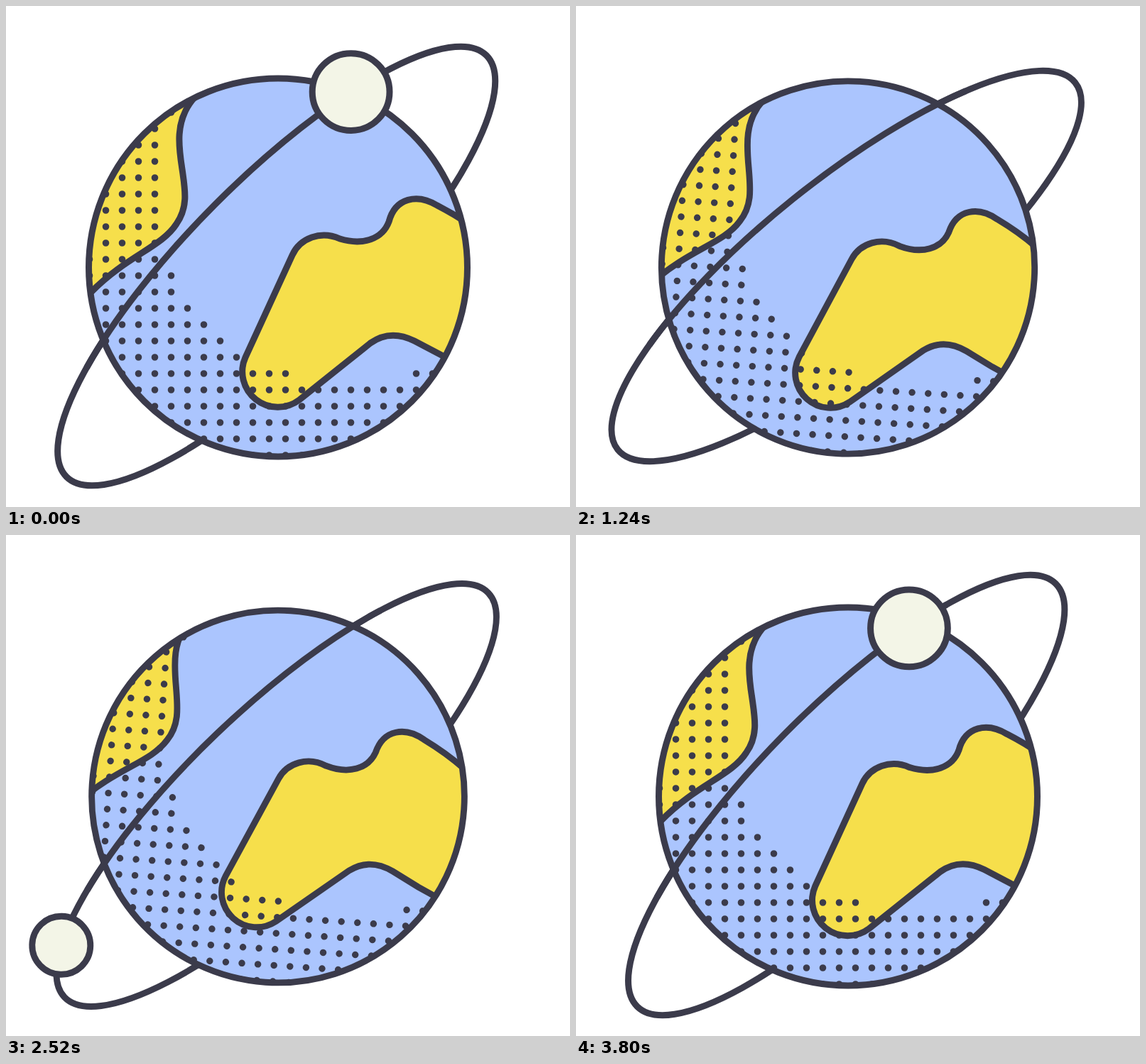
Animation, 794 px wide and 706 px high, one loop 3840 ms. Source, as an HTML page:

```html
<!DOCTYPE html>
<html lang="en">
<head>
<meta charset="utf-8">
<title>Planet and moon</title>
<style>
  html, body { margin: 0; width: 100%; height: 100%; overflow: hidden; background: #fff; }
  svg { display: block; width: 794px; height: 706px; }
  .line { stroke: #3b3b4b; stroke-width: 9; }
</style>
</head>
<body>
<svg viewBox="0 0 794 706" fill="none">
  <clipPath id="disc"><circle cx="383" cy="368.5" r="266.5"/></clipPath>

  <g class="ring">
    <path id="orbit" class="line" d="M419 0A419 122.5 0 0 1 -419 0A419 122.5 0 0 1 419 0Z"/>
    <circle id="moon" class="line" fill="#f3f5e7"/>
  </g>

  <g id="planet">
    <g clip-path="url(#disc)">
      <circle cx="383" cy="368.5" r="266.5" fill="#abc5fe"/>
      <g id="land" class="line" fill="#f6df4b">
        <path d="M285 105L262 133C238 163 243 198 248 230C252 258 257 283 240 307C219 340 170 352 120 403L60 460V105Z"/>
        <path d="M700 340L666 318Q640 298 607 281C579 264 548 270 539 304C530 328 503 338 470 328C443 316 414 327 403 351
                 L337 495A50 50 0 0 0 413 555L513 475Q541 455 575 472L613 492L700 533Z"/>
      </g>
      <path id="dots" stroke="#3b3b4b" stroke-width="9.6" stroke-linecap="round"/>
    </g>
    <circle class="line" cx="383" cy="368.5" r="266.5"/>
  </g>

  <g class="ring">
    <path class="line" d="M-290 -88.4A419 122.5 0 0 1 290 -88.4"/>
  </g>
</svg>
<script>
const LOOP = 3840, STEP = 23;
const $ = id => document.getElementById(id);
const orbit = $('orbit'), moon = $('moon');
const [back, front] = document.querySelectorAll('.ring');
const orbitLength = orbit.getTotalLength();

// Last dot column of each row; the disc clips the rest.
const rowEnds = [4, 3, 3, 3, 3, 3, 3, 3, 3, 3, 4, 4, 5, 6, 7, 8, 11, 20, 20, 20, 20, 20];
let dots = '';
const addDot = (col, row) => dots += `M${140.5 + STEP * col} ${150 + STEP * row}h.01`;
rowEnds.forEach((end, row) => {
  for (let col = -1; col <= end; col++) addDot(col, row);
});
addDot(19, 16);
addDot(20, 16);
$('dots').setAttribute('d', dots);

function draw(now) {
  const p = now % LOOP / LOOP;
  const cos = Math.cos(p * 2 * Math.PI), sin = Math.sin(p * 2 * Math.PI);
  const scale = 0.99 + 0.01 * cos;

  $('planet').setAttribute('transform',
    `translate(383 368.5) rotate(${2.5 - 2.5 * cos}) scale(${scale}) translate(-383 -368.5)`);
  $('land').setAttribute('transform',
    `translate(${12.3 * (cos - 1) + 2.4 * sin} ${cos - 1 + 7.5 * sin})`);

  const tilt = 42.6 + 2.55 * cos - 3 * sin;
  for (const ring of [back, front])
    ring.setAttribute('transform', `translate(380.7 366.5) rotate(${-tilt}) scale(${scale})`);

  // Constant speed along the orbit; its first half runs behind the planet.
  const travelled = (p + 0.886) % 1;
  const { x, y } = orbit.getPointAtLength(travelled * orbitLength);
  moon.setAttribute('cx', x);
  moon.setAttribute('cy', y);
  moon.setAttribute('r', 46.2 + 8.2 * cos);
  const layer = travelled < 0.5 ? back : front;
  if (moon.parentNode !== layer) layer.append(moon);
}

function tick() {
  draw(performance.now());
  requestAnimationFrame(tick);
}
tick();
</script>
</body>
</html>
```
